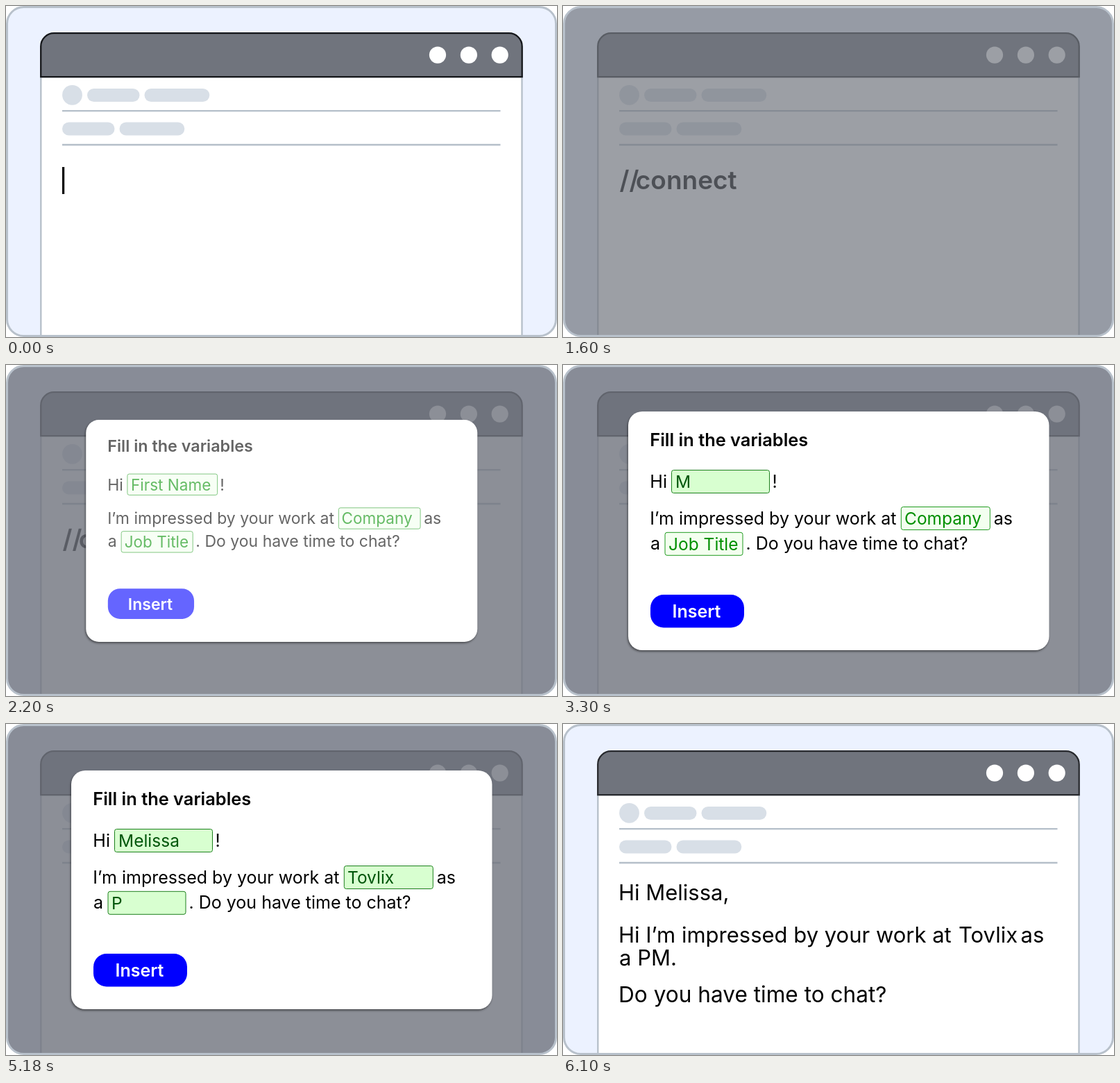
These frames come from a looping animation (794x477 px, 7.1 s). An HTML page:

```html
<!DOCTYPE html>
<html lang="en">
<head>
<meta charset="utf-8">
<title>Text snippet with variables</title>
<style>
  html, body { margin: 0; width: 100%; height: 100%; overflow: hidden; background: #fff; }
  svg { display: block; width: 794px; height: 477px; }
  text { font-family: Inter, "Open Sans", sans-serif; white-space: pre; }
  .strong { font-weight: 600; }
  .pill { fill: #d8dfe7; }
  .rule { stroke: #b5bfc9; stroke-width: 2.3; }
  #card { filter: drop-shadow(-.5px 2px 1.5px #0007); }
  .field rect { fill: #f3ffef; stroke: #1f9a1f; }
  .field text { fill: #008f00; }
  .field.filled rect { fill: #d8ffd0; stroke: #1c7f1c; }
  .field.filled text { fill: #00560a; }
</style>
</head>
<body>
<svg viewBox="0 0 794 477">
  <rect x="1.5" y="1.5" width="791" height="474" rx="24" fill="#ecf2ff"/>

  <g id="window">
    <path d="M50.3 475V102H743.5V475" fill="#fff" stroke="#b5bfc9" stroke-width="2.3"/>
    <path id="header" d="M50.2 102.2V58.2a19 19 0 0 1 19-19H724.7a19 19 0 0 1 19 19V102.2Z" fill="#70747d" stroke-width="2.3"/>
    <g fill="#fff">
      <circle cx="622" cy="70.6" r="12.1"/>
      <circle cx="666.9" cy="70.6" r="12.1"/>
      <circle cx="711.7" cy="70.6" r="12.1"/>
    </g>
    <g class="pill">
      <circle cx="95.5" cy="128.3" r="14.4"/>
      <rect x="117" y="119" width="75.5" height="19" rx="9.5"/>
      <rect x="199.5" y="119" width="93.8" height="19" rx="9.5"/>
      <rect x="81" y="167.5" width="75.5" height="19" rx="9.5"/>
      <rect x="163.5" y="167.5" width="93.8" height="19" rx="9.5"/>
    </g>
    <path class="rule" d="M81 151.2H712.5M81 200H712.5"/>
  </g>

  <rect id="caret" x="81" y="232" width="3.2" height="39"/>
  <g id="command" class="strong" font-size="37">
    <text id="slashes" x="81.5" y="264"></text>
    <text id="word" x="104.8" y="264"></text>
  </g>

  <g id="mail" font-size="31">
    <text x="80" y="254">Hi Melissa,</text>
    <text x="80" y="314.5">Hi I’m impressed by your work at</text>
    <text x="570" y="314.5">Tovlix</text>
    <text x="659.5" y="314.5">as</text>
    <text x="81" y="348">a PM.</text>
    <text x="80" y="400.5" font-size="31.6">Do you have time to chat?</text>
  </g>

  <rect id="shade" x="1.5" y="1.5" width="791" height="474" rx="24" fill="#70747d"/>

  <g id="popup">
    <rect id="card" x="94" y="67" width="606.5" height="344" rx="20" fill="#fff"/>
    <g id="form" font-size="25">
      <text class="strong" x="125.3" y="117" font-size="25.4">Fill in the variables</text>
      <text x="125.3" y="177">Hi</text>
      <text x="301.5" y="177">!</text>
      <text x="125.3" y="230">I’m impressed by your work at</text>
      <text x="620.8" y="230">as</text>
      <text x="126" y="266">a</text>
      <text x="263.5" y="266">. Do you have time to chat?</text>
      <g id="fields"></g>
      <rect x="126" y="331" width="135" height="47.5" rx="19" fill="#00f"/>
      <text class="strong" x="157.5" y="364" fill="#fff">Insert</text>
    </g>
    <circle id="tap" cx="193.3" cy="354.3" fill="#f2d68c" fill-opacity=".4" stroke="#f3ab2c"/>
  </g>

  <rect x="1.5" y="1.5" width="791" height="474" rx="24" fill="none" stroke="#b8c1cb" stroke-width="3"/>
</svg>

<script>
const LOOP = 7100, COMMAND = '//connect';
const $ = id => document.getElementById(id);
const clamp = (v, lo, hi) => Math.max(lo, Math.min(hi, v));
const show = (id, on) => $(id).style.display = on ? '' : 'none';
const put = (node, text) => { if (node.textContent !== text) node.textContent = text; };
const zoom = (id, k, x, y) =>
  $(id).setAttribute('transform', `translate(${x} ${y}) scale(${k}) translate(${-x} ${-y})`);

// Number of steps taken since start, counting the first one as 1
const steps = (t, start, size, max) => clamp(Math.floor((t - start) / size) + 1, 0, max);
const stepped = (t, start, size, values) => values[steps(t, start, size, values.length) - 1] ?? 0;

const fields = [
  { x: 156.5, y: 151.5, w: 141, tx: 162, base: 177, hint: 'First Name', value: 'Melissa', start: 3300 },
  { x: 487.3, y: 204.5, w: 128, tx: 492, base: 230, hint: 'Company', value: 'Tovlix', start: 4280 },
  { x: 147, y: 241.3, w: 112, tx: 152, base: 267, hint: 'Job Title', value: 'PM', start: 5180 }
];

$('fields').innerHTML = fields.map(f => `<g class="field">
  <rect x="${f.x}" y="${f.y}" width="${f.w}" height="33" rx="3"/>
  <text x="${f.tx}" y="${f.base}" font-size="24.5"></text></g>`).join('');
fields.forEach((f, i) => f.node = $('fields').children[i]);

function draw(t) {
  const done = t >= 6100;
  $('header').setAttribute('stroke', t < 200 ? '#15171a' : '#282a2e');

  const typed = COMMAND.slice(0, steps(t, 500, 100, COMMAND.length));
  show('caret', t < 200 || (t >= 400 && t < 500));
  show('command', t < 2300);
  put($('slashes'), typed.slice(0, 2));
  put($('word'), typed.slice(2));

  $('shade').setAttribute('opacity', done ? 0 : stepped(t, 1400, 100, [.1, .4, .69, .76, .79, .8]));

  // The form swings a little further than its card
  show('popup', t >= 2000 && !done);
  const scale = stepped(t, 2000, 100, [.32, .66, .93, 1.07, 1]);
  zoom('card', scale, 397.2, 239);
  zoom('form', 1 + (scale - 1) * 1.14, 387, 221);
  $('form').setAttribute('opacity', steps(t, 2000, 100, 5) / 5);

  for (const f of fields) {
    const n = steps(t, f.start, 80, f.value.length);
    f.node.classList.toggle('filled', n > 0);
    put(f.node.querySelector('text'), n ? f.value.slice(0, n) : f.hint);
  }

  show('tap', t >= 5760);
  $('tap').setAttribute('r', stepped(t, 5760, 80, [17, 23, 29]));
  $('tap').setAttribute('opacity', t < 6000 ? 1 : .5);

  show('mail', done);
}

const begin = performance.now();
function frame() {
  draw((performance.now() - begin) % LOOP);
  requestAnimationFrame(frame);
}
frame();
</script>
</body>
</html>
```
